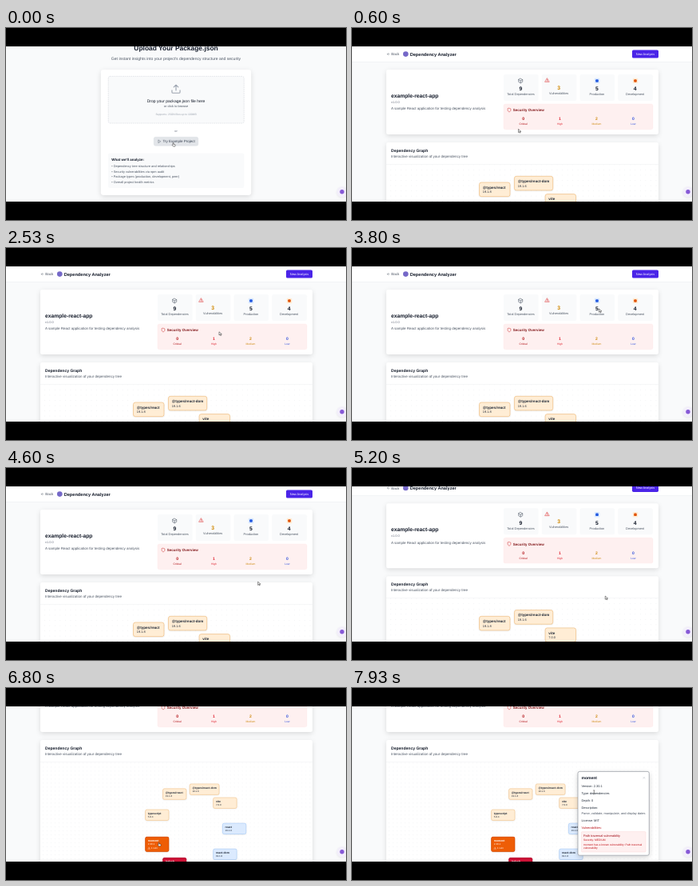
An HTML page with a canvas that plays this animation: 426x240 px, repeating every 8000 ms.

```html
<!DOCTYPE html>
<html lang="en">
<head>
<meta charset="utf-8">
<title>Dependency analysis</title>
<style>
  html, body { margin: 0; width: 100%; height: 100%; overflow: hidden; background: #000; }
  canvas { display: block; width: 426px; height: 240px; }
</style>
</head>
<body>
<canvas id="stage" width="426" height="240"></canvas>
<script>
const ctx = document.getElementById('stage').getContext('2d');
const LOOP = 8000;
const U = 0.2804;            // stage pixels per page pixel
const TOP = 23, BOTTOM = 217;
const INK = '#111827', GREY = '#4b5563', MUTED = '#6b7280', PALE = '#f9fafb', LINE = '#e5e7eb';

const PATHS = {
  upload: 'M21 15v4a2 2 0 0 1-2 2H5a2 2 0 0 1-2-2v-4M17 8l-5-5-5 5M12 3v12',
  play: 'M6 3l14 9-14 9z',
  back: 'M12 19l-7-7 7-7M19 12H5',
  box: 'M12 2l9 5v10l-9 5-9-5V7zM3 7l9 5 9-5M12 12v10',
  warn: 'M12 3L22 20H2zM12 9v5M12 17v.2',
  shield: 'M12 2l8 3v7c0 6-4 8-8 10c-4-2-8-4-8-10V5z',
  close: 'M18 6L6 18M6 6l12 12'
};
const ARROW = new Path2D('M0 0V15L4 11.5 6.5 17 9 16 6.5 10.5H12Z');
const HAND = new Path2D('M4 1q2-2 3 0v6l6 1q2 1 1.5 4l-1.5 5H6L1 11q0-2 3-1z');
const BEAM = new Path2D('M-3-8Q0-8 0-6V6Q0 8-3 8M3-8Q0-8 0-6M0 6Q0 8 3 8');

const NODES = [
  // name, version, kind, angle in degrees, width
  ['react', '19.1.0', 'prod', 0, 120],
  ['react-dom', '19.1.0', 'prod', 40, 120],
  ['axios', '1.10.0', 'prod', 80, 120],
  ['lodash', '4.17.21', 'high', 120, 120],
  ['moment', '2.30.1', 'medium', 160, 120],
  ['typescript', '5.8.3', 'dev', 200, 120],
  ['@types/react', '19.1.8', 'dev', 240, 120],
  ['@types/react-dom', '19.1.6', 'dev', 280, 150],
  ['vite', '7.0.0', 'dev', 320, 120]
];
const KINDS = {
  prod: { fill: '#dbeafe', edge: '#9cc5f5', ink: '#1f2937' },
  dev: { fill: '#ffedd5', edge: '#efbd80', ink: '#1f2937' },
  medium: { fill: '#ee5d06', edge: '#c9480a', ink: '#fff', vulns: 1 },
  high: { fill: '#cc1236', edge: '#a80d2b', ink: '#fff', vulns: 1 }
};

const ease = p => p * p * (3 - 2 * p);

// Eased value through [time, value] keys.
function track(keys, t) {
  const i = keys.findIndex(k => k[0] > t);
  if (i < 0) return keys[keys.length - 1][1];
  if (i === 0) return keys[0][1];
  const [t0, a] = keys[i - 1], [t1, b] = keys[i];
  return a + (b - a) * ease((t - t0) / (t1 - t0));
}

const SCROLL = [[5120, 0], [5195, 7.7], [5330, 7.7], [5530, 78]];
const ZOOM = [[5450, 1], [5665, 0.783], [5690, 0.783], [5800, 0.765]];
const CURSOR_X = [[330, 208], [1300, 210.5], [1600, 210.5], [2400, 267], [2700, 267], [3600, 309.5],
  [3900, 309.5], [4900, 317.3], [6000, 317], [6780, 190], [7030, 190], [7900, 303.3]];
const CURSOR_Y = [[330, 143.3], [1300, 54.8], [1600, 54.8], [2400, 104.8], [2700, 104.8], [3600, 76],
  [3900, 76], [4900, 160.3], [6000, 159], [6780, 193], [7030, 193], [7900, 130]];
const PAGE_AT = 260, POPUP_AT = 7000;

function text(str, x, y, size, color, bold = false, align = 'left') {
  ctx.save();
  ctx.translate(x, y);
  ctx.scale(U, U);
  ctx.font = `${bold ? 'bold ' : ''}${size}px "Liberation Sans", Arial, sans-serif`;
  ctx.textAlign = align;
  ctx.fillStyle = color;
  ctx.fillText(str, 0, 0);
  ctx.restore();
}
const centred = (str, x, y, size, color, bold) => text(str, x, y, size, color, bold, 'center');

function panel(x, y, w, h, r, fill, edge, lineWidth = U, dash = []) {
  ctx.beginPath();
  ctx.roundRect(x, y, w, h, r);
  ctx.fillStyle = fill;
  ctx.fill();
  if (!edge) return;
  ctx.strokeStyle = edge;
  ctx.lineWidth = lineWidth;
  ctx.setLineDash(dash);
  ctx.stroke();
  ctx.setLineDash([]);
}

function raised(blur, alpha, draw) {
  ctx.save();
  ctx.shadowColor = `rgba(0,0,0,${alpha})`;
  ctx.shadowBlur = blur;
  ctx.shadowOffsetY = blur / 3;
  draw();
  ctx.restore();
}

function dot(x, y, r, fill) {
  ctx.beginPath();
  ctx.arc(x, y, r, 0, Math.PI * 2);
  ctx.fillStyle = fill;
  ctx.fill();
}

function icon(name, cx, cy, size, color) {
  ctx.save();
  ctx.translate(cx, cy);
  ctx.scale(size * U / 24, size * U / 24);
  ctx.translate(-12, -12);
  ctx.strokeStyle = color;
  ctx.lineWidth = 2;
  ctx.lineCap = ctx.lineJoin = 'round';
  ctx.stroke(new Path2D(PATHS[name]));
  ctx.restore();
}

function uploadPage() {
  centred('Upload Your Package.json', 213, 27.7, 30, INK, true);
  centred("Get instant insights into your project's dependency structure and security", 213, 39.8, 18, GREY);
  raised(6, 0.13, () => panel(118.8, 52, 188.4, 157, 3.4, '#fff'));
  panel(128.2, 60.4, 170, 58.6, 2.2, PALE, '#d1d5db', 0.56, [1.7, 0.9]);
  icon('upload', 213, 76.2, 48, '#9ca3af');
  centred('Drop your package.json file here', 213, 92.9, 18, INK);
  centred('or click to browse', 213, 99.3, 14, GREY);
  centred('Supports: JSON files up to 100MB', 213, 108.7, 12, '#9ca3af');
  centred('or', 213, 129.8, 14, MUTED);
  panel(185.2, 136.3, 55.6, 11, 2.2, '#e2e5e9', '#d1d5db');
  icon('play', 192.3, 141.8, 16, '#374151');
  text('Try Example Project', 196.4, 143.4, 16, '#374151');
  panel(128, 156.4, 170.4, 43.6, 2.2, PALE);
  text("What we'll analyze:", 132.2, 165.8, 16, INK, true);
  ['Dependency tree structure and relationships', 'Security vulnerabilities via npm audit',
    'Package types (production, development, peer)', 'Overall project health metrics']
    .forEach((s, i) => text('• ' + s, 132.2, 173.8 + i * 6.73, 14, GREY));
}

function header() {
  ctx.fillStyle = '#fff';
  ctx.fillRect(0, 0, 426, 42);
  ctx.fillStyle = LINE;
  ctx.fillRect(0, 42, 426, 0.4);
  icon('back', 45.6, 32.7, 16, GREY);
  text('Back', 49.2, 34.3, 16, GREY);
  dot(67.3, 32.6, 3.3, '#7568c8');
  text('Dependency Analyzer', 72.7, 34.6, 20, INK, true);
  panel(351, 27.4, 33, 10.2, 1.7, '#4a24e8');
  centred('New Analysis', 367.5, 34, 14, '#fff');
}

function stat(i, value, label, color = INK, lift = 0) {
  const x = 190 + i * 47.75, cx = x + 21.8;
  panel(x, 58, 43.6, 33, 2.2, PALE);
  centred(value, cx - 0.4, 78.4 - lift, 24, color, true);
  centred(label, cx - 0.4, 84.3 - lift, 14, GREY);
}

function badge(x, back, front) {
  panel(x - 3.3, 62.7, 6.6, 6.6, 1.2, back);
  panel(x - 1.8, 64.2, 3.6, 3.6, 1.2, front);
}

function summary() {
  raised(6, 0.13, () => panel(43, 52, 341, 81, 2.2, '#fff'));
  text('example-react-app', 49, 86.6, 24, INK, true);
  text('v1.0.0', 49, 93.5, 14, MUTED);
  text('A sample React application for testing dependency analysis', 49, 102.3, 16, GREY);

  stat(0, '9', 'Total Dependencies');
  stat(1, '3', 'Vulnerabilities', '#d08700', 1.4);
  stat(2, '5', 'Production');
  stat(3, '4', 'Development');
  icon('box', 211.2, 66, 24, GREY);
  icon('warn', 244.6, 65.3, 22, '#dc2626');
  badge(307, '#dbeafe', '#2158e0');
  badge(355, '#ffedd5', '#e2540c');

  panel(190, 95, 187, 31.8, 2.2, '#fef0f0', '#fde2e2');
  icon('shield', 197, 102.6, 20, '#c81e1e');
  text('Security Overview', 201.8, 104.3, 16, '#82181a', true);
  [['0', 'Critical', '#b00d12'], ['1', 'High', '#e02430'], ['2', 'Medium', '#cf8a10'], ['0', 'Low', '#3050dc']]
    .forEach(([n, label, color], i) => {
      const x = 214.6 + i * 45.9;
      centred(n, x, 115.4, 18, color, true);
      centred(label, x, 121.4, 12, color);
    });
}

function node([name, version, kind, angle, width]) {
  const { fill, edge, ink, vulns } = KINDS[kind];
  const a = angle * Math.PI / 180, r = 200 * U;
  const w = width * U, h = (vulns ? 76 : 56) * U, left = 14 * U;
  ctx.save();
  ctx.translate(Math.cos(a) * r, Math.sin(a) * r);
  raised(2, 0.12, () => panel(U, U, w - 2 * U, h - 2 * U, 8 * U, fill));
  panel(U, U, w - 2 * U, h - 2 * U, 8 * U, fill, edge, 2 * U);
  text(name, left, 25 * U, 14, ink, true);
  text(version, left, 42 * U, 12, ink);
  if (vulns) {
    icon('warn', left + 6 * U, 58 * U, 12, ink);
    text(vulns + ' vuln', left + 16 * U, 62 * U, 12, ink);
  }
  ctx.restore();
}

function graph(zoom, scroll) {
  raised(6, 0.13, () => panel(43, 143, 341, 200, 2.2, '#fff'));
  text('Dependency Graph', 49, 154.9, 18, INK, true);
  text('Interactive visualization of your dependency tree', 49, 161.7, 16, GREY);
  ctx.fillStyle = LINE;
  ctx.fillRect(43, 170.3, 341, 0.35);

  ctx.save();
  ctx.beginPath();
  ctx.rect(43, 170.7, 341, 172);
  ctx.clip();
  // Wheel zoom keeps the point under the pointer fixed.
  const px = 317, py = 239;
  const ox = px + (191.8 - px) * zoom, oy = py + (249.2 - py) * zoom;
  const scale = 1.163 * zoom, gap = 20 * U * scale;
  const first = (origin, edge) => origin - Math.floor((origin - edge) / gap) * gap;
  ctx.fillStyle = '#dfe2e6';
  for (let x = first(ox, 43); x < 384; x += gap)
    for (let y = first(oy, 170.7); y < BOTTOM + scroll; y += gap)
      ctx.fillRect(x - 0.3, y - 0.3, 0.6, 0.6);
  ctx.translate(ox, oy);
  ctx.scale(scale, scale);
  NODES.forEach(node);
  ctx.restore();
}

function popup() {
  const x = 287.4;
  ctx.save();
  ctx.translate(0, 78);
  raised(6, 0.2, () => panel(283, 104.4, 89.3, 104.8, 2.2, '#fff'));
  panel(283, 104.4, 89.3, 104.8, 2.2, '#fff', '#747a85', 0.55);
  text('moment', x, 114.2, 18, INK, true);
  icon('close', 365.9, 112.3, 14, '#9ca3af');
  [['Version: 2.30.1', 124], ['Type: dependencies', 133], ['Depth: 0', 142], ['Description:', 151],
    ['License: MIT', 166.6]].forEach(([s, y]) => text(s, x, y, 14, '#1f2937'));
  text('Parse, validate, manipulate, and display dates', x, 157.7, 14, GREY);
  text('Vulnerabilities:', x, 175.6, 14, '#b80c12');
  panel(x, 179.6, 80.7, 25.4, 1.1, '#fef0f0', '#fbc5c5');
  text('Path traversal vulnerability', 290, 185.9, 14, '#9f0712');
  text('Severity: MEDIUM', 290, 190.9, 12, '#c10f16');
  text('moment has a known vulnerability: Path traversal', 290, 196.7, 12, '#c10f16');
  text('vulnerability', 290, 201.2, 12, '#c10f16');
  ctx.restore();
}

function cursor(t) {
  const onHand = t < PAGE_AT || (t > 5330 && t < 7250);
  ctx.save();
  ctx.translate(track(CURSOR_X, t), track(CURSOR_Y, t));
  ctx.scale(U, U);
  ctx.lineJoin = 'round';
  ctx.strokeStyle = '#222';
  ctx.fillStyle = '#fff';
  ctx.lineWidth = 1.8;
  if (t > 7600) {
    ctx.stroke(BEAM);
  } else {
    const shape = onHand ? HAND : ARROW;
    ctx.fill(shape);
    ctx.stroke(shape);
  }
  ctx.restore();
}

function draw(t) {
  ctx.fillStyle = '#000';
  ctx.fillRect(0, 0, 426, 240);
  ctx.save();
  ctx.beginPath();
  ctx.rect(0, TOP, 426, BOTTOM - TOP);
  ctx.clip();
  ctx.fillStyle = PALE;
  ctx.fillRect(0, TOP, 426, BOTTOM - TOP);

  if (t < PAGE_AT) {
    uploadPage();
  } else {
    const scroll = track(SCROLL, t);
    ctx.save();
    ctx.translate(0, -scroll);
    header();
    summary();
    graph(track(ZOOM, t), scroll);
    if (t >= POPUP_AT) popup();
    ctx.restore();
  }
  raised(3, 0.08, () => dot(421, 204.8, 6.6, '#f3effb'));
  dot(421, 204.8, 2.7, '#8659d6');
  cursor(t);
  ctx.restore();
}

function frame() {
  draw(performance.now() % LOOP);
  requestAnimationFrame(frame);
}
ctx.textRendering = 'geometricPrecision';
frame();
</script>
</body>
</html>
```
